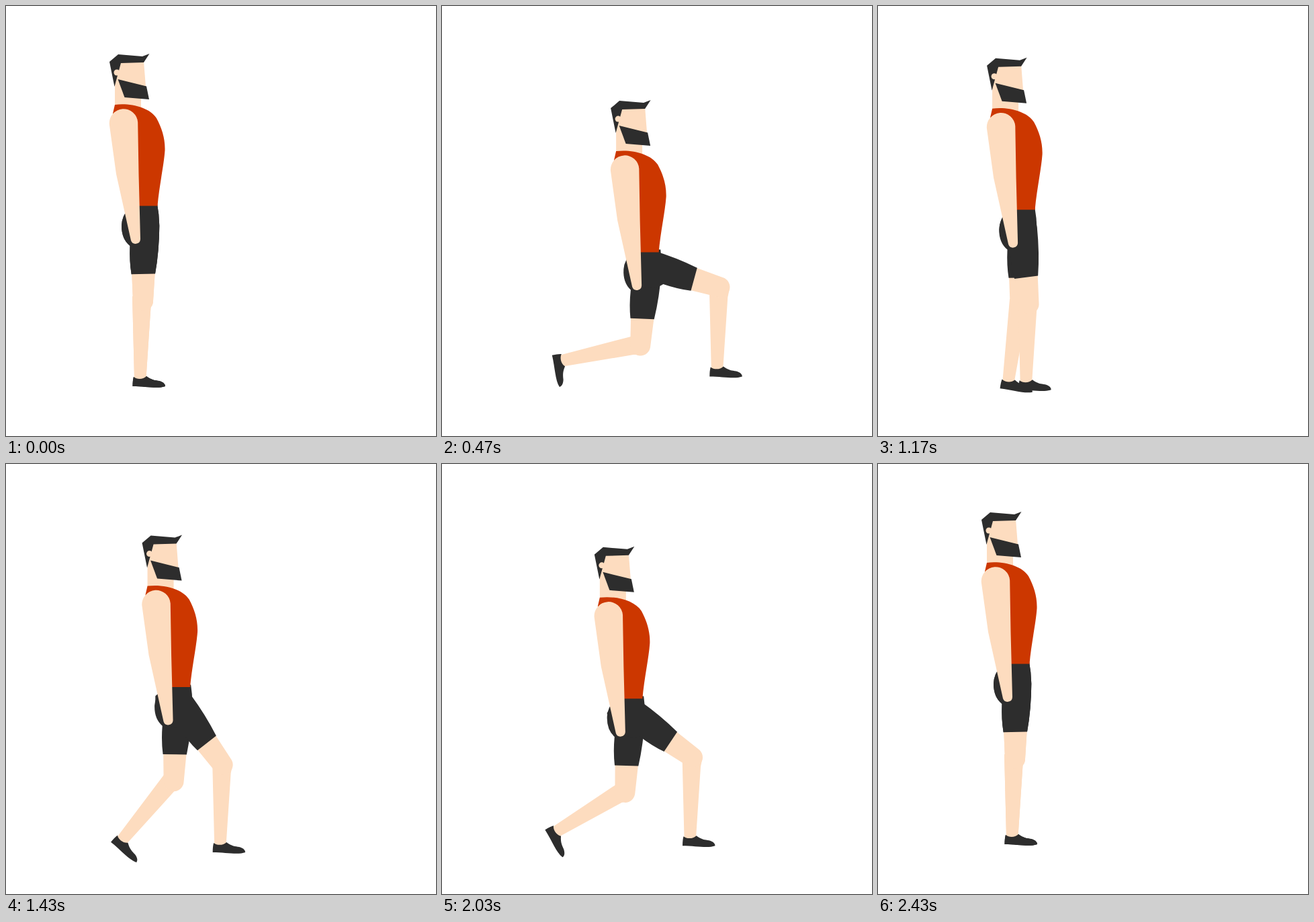
An HTML page for the animation above (2660 ms loop, 640 px wide and 640 px high).

```html
<!DOCTYPE html>
<html lang="en">
<head>
<meta charset="utf-8">
<title>Lunges</title>
<style>
  html, body { margin: 0; width: 100%; height: 100%; overflow: hidden; background: #fff; }
  svg { display: block; width: 100%; height: 100%; --e: 0; }
  .skin { fill: #fddcbf; }
  .dark { fill: #2d2d2d; }
  .red { fill: #cc3700; }
  /* --e runs from 0 (standing) to 1 (deepest lunge) */
  .body { transform: translate(calc(var(--e) * 121.4px), calc(var(--e) * 86.4px)); }
  .shin { transform-origin: 204px 436px; }
  .back.thigh {
    transform-origin: 205px 345px;
    transform: translateY(calc(var(--e) * -3px)) rotate(calc(var(--e) * 4.5deg));
  }
  .back.shin { transform: translateX(calc(var(--e) * -9px)) rotate(calc(var(--e) * 96deg)); }
  .front.thigh {
    transform-origin: 205px 321px;
    transform: translate(calc(var(--e) * -2px), calc(var(--e) * -7.5px)) rotate(calc(var(--e) * -92deg));
  }
  /* the front shin swings with the knee but stays upright */
  .swing { transform-origin: 206px 321px; transform: rotate(calc(var(--e) * -94deg)); }
  .front.shin { transform: rotate(calc(var(--e) * 94deg)); }
</style>
</head>
<body>
<svg id="stage" viewBox="0 0 640 640">
  <defs>
    <g id="upper">
      <path class="skin" d="M187 392H222L219 439A15 15 0 0 1 189 439Z"/>
      <path class="dark" d="M185 297L225 294.500Q228 310 228.300 327Q228 365 222 398.600L186.700 399.300Q183.500 380 184.500 357Q172 347 172 327Q172 313 185 297Z"/>
    </g>
    <g id="lower">
      <path class="skin" d="M188 432L191 554Q200 558 208.500 554L215.500 448L218 436Z"/>
      <path class="dark" d="M190 552C195 556 204 556 209 551C217 557 222 557 228 558C235 560 237 563 237 566C226 570 208 566 188.500 566Q188.500 557 190 552Z"/>
    </g>
  </defs>
  <g class="body">
    <use class="back shin" href="#lower"/>
    <use class="back thigh" href="#upper"/>
    <g class="swing"><use class="front shin" href="#lower"/></g>
    <use class="front thigh" href="#upper"/>
    <path class="skin" d="M168 82H205L208 120L201 138V156H162V115Z"/>
    <path class="dark" d="M154 83L167 72L203 75L213.500 71L205 84L171 85L161.500 120Z"/>
    <circle class="skin" cx="165" cy="99" r="4.500"/>
    <path class="dark" d="M166.500 109L209 119.500L213 139L176.500 136Z"/>
    <path class="red" d="M162 147C185 144 214 151 224 167C232 182 237 197 236.500 215C235 237 228 268 225.500 297.500H180L159 160Z"/>
    <path class="skin" d="M153.800 176A21.200 21.200 0 0 1 196.200 173L197.500 250L200 347A7.200 7.200 0 0 1 186 349L164 250Z"/>
  </g>
</svg>
<script>
  const LOOP = 2660, TICK = 100 / 3, HALF = 15, REPS = 2;
  const stage = document.getElementById("stage");

  // 25 poses a second, each held to the nearest tick of a 30 Hz clock
  function poseAt(ms) {
    const tick = Math.floor((ms + 4) / TICK);
    return Math.floor((tick + 0.499) / 1.2);
  }

  function depth(pose) {
    if (pose >= REPS * 2 * HALF) return 0;
    return 1 - Math.abs(pose % (2 * HALF) - HALF) / HALF;
  }

  function draw(now) {
    stage.style.setProperty("--e", depth(poseAt(now % LOOP)));
    requestAnimationFrame(draw);
  }
  requestAnimationFrame(draw);
</script>
</body>
</html>
```
